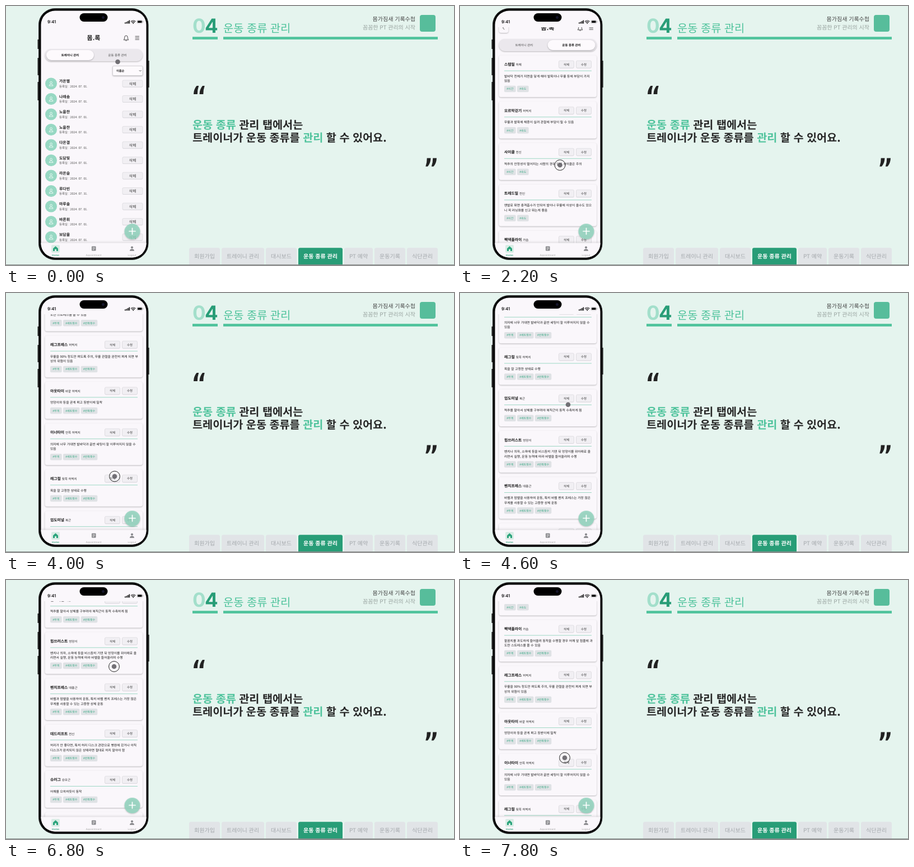
Animation of 800x464 px, one loop 8000 ms. Source, as an HTML page:

```html
<!DOCTYPE html>
<html lang="ko">
<head>
<meta charset="utf-8">
<style>
html, body { margin: 0; width: 100%; height: 100%; overflow: hidden; background: #e5f4ee; }
svg { display: block; width: 800px; height: 464px; font-family: "Noto Sans CJK KR", "Noto Sans CJK JP", sans-serif; text-rendering: geometricPrecision; }
.latin { font-family: Inter, sans-serif; }
.raised { filter: drop-shadow(0 1px 1.2px rgba(0,0,0,.26)); }
.line { fill: none; stroke-linecap: round; stroke-linejoin: round; }
</style>
</head>
<body>
<svg viewBox="0 0 800 464">
  <defs>
    <clipPath id="screenClip"><rect x="62.5" y="8.5" width="188" height="442" rx="25"/></clipPath>
    <clipPath id="listClip"><rect x="62.5" y="38" width="188" height="387"/></clipPath>
    <path id="quote" d="M5.500 0H9.200L7.300 7.500 6.800 15H0L.5 10.500C1.300 6.500 3 3 5.500 0Z"/>
  </defs>

  <g id="slide">
    <rect x="333" y="55.2" width="45" height="4.700" fill="#4fc39c"/>
    <rect x="388" y="55.2" width="383" height="4.700" fill="#4fc39c"/>
    <rect x="739" y="16" width="28" height="30" rx="4" fill="#57bd9b"/>
    <g fill="#222">
      <use href="#quote" x="335" y="143"/><use href="#quote" x="345.500" y="143"/>
      <g transform="rotate(180 759.500 280)"><use href="#quote" x="750" y="272.500"/><use href="#quote" x="760.500" y="272.500"/></g>
    </g>
  </g>

  <g id="phone">
    <path d="M57.700 60v17M57.700 93v31M57.700 136v33M254.500 98v48" stroke="#111" stroke-width="2.200"/>
    <rect x="58.500" y="4.500" width="195.500" height="450" rx="29" fill="#050505" stroke="#2b2b2d"/>
    <g clip-path="url(#screenClip)">
      <rect x="62" y="8" width="190" height="443" fill="#faf7fb"/>
      <g clip-path="url(#listClip)"><g id="scroll"></g></g>
      <g id="overlay">
        <g class="raised"><circle cx="225.500" cy="404" r="14" fill="#92d6c0" opacity=".84"/></g>
        <path class="line" d="M220 403.500h11M225.500 398v11" stroke="#fff" stroke-width="1.700"/>
        <rect x="62" y="424.500" width="190" height="30" fill="#faf7fb" style="filter:drop-shadow(0 -1px 2px rgba(0,0,0,.14))"/>
        <rect x="81" y="428" width="15" height="14" rx="2" fill="#d9ece5"/>
        <path d="M84 434.500l4.500-4.200 4.500 4.200v4.500h-3v-3.200h-3v3.200h-3z" fill="#2ba47c"/>
        <rect x="153" y="430.500" width="7.500" height="8" rx="1" fill="#858589"/>
        <path d="M154.500 432.700h4.500M154.500 434.600h4.500M154.500 436.500h3" stroke="#fff" stroke-width=".7"/>
        <circle cx="225" cy="432.500" r="2" fill="#858589"/><path d="M221 438.800q0-3.500 4-3.500t4 3.500z" fill="#858589"/>
      </g>
    </g>
    <rect x="131.500" y="13" width="50" height="15" rx="7.500"/>
    <circle cx="173.500" cy="20.500" r="2.500" fill="#15152a"/>
    <path d="M212.800 31.500v-2M215.300 31.500v-3M217.800 31.500v-4.500M220.300 31.500v-6" stroke="#111" stroke-width="1.700"/>
    <path class="line" d="M223.500 27.500q3.700-3 7.400 0M225 29.300q2.200-1.700 4.400 0" stroke="#111" stroke-width="1.200"/>
    <circle cx="227.200" cy="31" r=".9"/>
    <rect x="234" y="25.500" width="9.600" height="5.600" rx="1.700" fill="none" stroke="#999" stroke-width=".6"/>
    <rect x="235" y="26.500" width="7.600" height="3.600" rx="1"/>
    <path d="M244.700 27.300v2" stroke="#999" stroke-width=".9"/>
  </g>

  <g id="cursor">
    <circle id="ring" r="9.400" fill="#fff" fill-opacity=".2" stroke="#222" stroke-width="1"/>
    <circle r="4.300" fill="#67656a" opacity=".92"/>
  </g>
</svg>

<script>
const el = id => document.getElementById(id);
const add = (id, markup) => el(id).insertAdjacentHTML("beforeend", markup);

// y is the visual middle of the text
const text = (x, y, size, content, fill = "#222", weight = 400, anchor = "start", cls = "") =>
  `<text x="${x}" y="${y + size * .37}" font-size="${size}" fill="${fill}" font-weight="${weight}" text-anchor="${anchor}" class="${cls}">${content}</text>`;
const box = (x, y, w, h, r, fill, extra = "") =>
  `<rect x="${x}" y="${y}" width="${w}" height="${h}" rx="${r}" fill="${fill}" ${extra}/>`;
const button = (x, y, w, h, size, label) =>
  box(x, y + .5, w, h, 2, "#d3d1d6") +
  box(x, y, w, h, 2, "#f1eff3", 'stroke="#d6d4d9" stroke-width=".6"') +
  text(x + w / 2, y + h / 2, size, label, "#333", 400, "middle");

const GREEN = "#4fc39c", DEEP = "#289d77";

// Slide heading, message and footer tabs
const accent = word => `<tspan fill="${GREEN}">${word}</tspan>`;
add("slide",
  text(333, 35.3, 35, `<tspan fill="#a3dfcb">0</tspan><tspan dx="-1.500">4</tspan>`, DEEP, 700, "start", "latin") +
  text(388, 39.5, 19.8, "운동 종류 관리", GREEN, 500) +
  text(731, 23.5, 10, "몸가짐새 기록수첩", "#444", 500, "end") +
  text(731, 38, 10, "꼼꼼한 PT 관리의 시작", "#98a39f", 400, "end") +
  text(333, 213, 19.65, `${accent("운동 종류")} 관리 탭에서는`, "#262626", 700) +
  text(333, 236, 19.65, `트레이너가 운동 종류를 ${accent("관리")} 할 수 있어요.`, "#262626", 700));

let tabX = 327;
for (const [label, width] of [["회원가입", 55], ["트레이니 관리", 76], ["대시보드", 55], ["운동 종류 관리", 79],
                              ["PT 예약", 51], ["운동기록", 55], ["식단관리", 55]]) {
  const active = width === 79;
  add("slide", box(tabX, 433.3, width, 34, 3, active ? DEEP : "#e1e4e7") +
    text(tabX + width / 2, 448, 10, label, active ? "#fff" : "#a4a8ac", active ? 700 : 500, "middle"));
  tabX += width + 3;
}
add("slide", box(0, 463, 800, 1, 0, "#858b89"));

// Phone chrome
add("phone", text(74, 28, 7.6, "9:41", "#111", 600, "start", "latin"));
add("overlay",
  text(88.5, 446, 4.6, "Home", DEEP, 500, "middle", "latin") +
  text(156.5, 446, 4.6, "Appointment", "#aaa", 400, "middle", "latin") +
  text(225, 446, 4.6, "Logout", "#aaa", 400, "middle", "latin"));

const pageTop = exercises => {
  const pill = exercises ? 156.5 : 72;
  const tab = (x, label, on) => text(x, 87.7, 5.4, label, on ? "#111" : "#444", on ? 700 : 400, "middle");
  return text(156.5, 57, 11, "몸.록", "#222", 700, "middle") +
    `<g class="line" stroke="#333" stroke-width=".9"><path d="M210.500 60.500q1.200-1 1.200-4 0-3.500 2.800-3.500t2.800 3.500q0 3 1.200 4zM213.500 62q1 .8 2 0M231 54.300h6.500M231 57.200h6.500M231 60.100h6.500"/></g>` +
    (exercises ? box(69.5, 48, 17, 18, 4, "#faf7fb", 'class="raised"') +
      `<path class="line" d="M79 54.500l-2.500 2.700 2.500 2.700" stroke="#444" stroke-width=".9"/>` : "") +
    box(69.5, 77, 174.5, 22, 11, "#ebe8ed", 'class="raised"') +
    box(pill, 79, 85, 18, 9, "#fdfafd", 'class="raised"') +
    tab(114.5, "트레이니 관리", !exercises) + tab(199, "운동 종류 관리", exercises);
};

// Trainee list
const trainees = "가온별 나래솜 노을찬 노을찬 다온결 도담빛 라온슬 루다빈 마루솔 바론휘 보담율".split(" ");
const traineeRow = (name, i) => {
  const y = 139 + 27.5 * i;
  return `<circle cx="80.500" cy="${y}" r="10.500" fill="#97d8c3"/>
    <g transform="translate(80.500 ${y})" fill="none" stroke="#eefaf5" stroke-width=".9"><circle cy="-1.800" r="1.900"/><path d="M-3.500 4q0-3 3.500-3t3.500 3z"/></g>` +
    text(95, y - 4.2, 6.9, name, "#222", 700) +
    text(95, y + 5, 5.4, `등록일 : 2024. 07. ${i === 7 ? 31 : "01"}.`, "#555") +
    button(208, y - 6, 36, 12, 6.9, "삭제");
};

// Exercise cards: name, body part, description lines
const exercises = [
  "스텝밀/하체/발바닥 전체가 지면을 닿게 해야 발목이나 무릎 등에 부담이 가지/않음",
  "오르막걷기/허벅지/무릎과 발목에 체중이 실려 관절에 부담이 될 수 있음",
  "사이클/전신/척추의 안정성이 떨어지는 사람의 경우 입식 사이클은 주의",
  "트레드밀/전신/맨발로 뛰면 충격흡수가 안되어 발이나 무릎에 이상이 올수도 있으/니 꼭 러닝화를 신고 뛰는게 좋음",
  "펙덱플라이/가슴/팔꿈치를 과도하게 들어올려 동작을 수행할 경우 어깨 앞 힘줄에 과/도한 스트레스를 줄 수 있음",
  "레그프레스/허벅지/무릎을 90% 정도만 펴도록 주의, 무릎 관절을 완전히 펴게 되면 부/상의 위험이 있음",
  "아웃타이/바깥 허벅지/엉덩이와 등을 곧게 펴고 등받이에 밀착",
  "이너타이/안쪽 허벅지/의자에 너무 기대면 발바닥과 골반 세팅이 잘 이루어지지 않을 수/있음",
  "레그컬/뒷쪽 허벅지/목을 잘 고정한 상태로 수행",
  "업도미널/복근/척추를 말아서 상체를 구부려야 복직근이 동적 수축하게 됨",
  "힙쓰러스트/엉덩이/벤치나 의자, 소파에 등을 비스듬히 기댄 뒤 엉덩이를 위아래로 올/리면서 실행, 운동 능력에 따라 바벨을 들어올리며 수행",
  "벤치프레스/대흉근/바벨과 덤벨을 사용하여 운동, 특히 바벨 벤치 프레스는 가장 많은/무게를 사용할 수 있는 고중량 상체 운동",
  "데드리프트/전신/허리가 안 좋다면, 특히 허리 디스크 관련으로 병원에 갔거나 아직/디스크가 완치되지 않은 상태라면 절대로 하지 말아야 함",
  "슈러그/승모근/어깨를 으쓱하듯이 동작",
  "레더럴레이즈/삼각근/양손에 덤벨을 들고 실시하는 것이 보통이나 케이블 등으로 대체 가/능",
  "덤벨컬/이두근/팔꿈치를 고정한 상태로 수행"
];
let cardY = 122.5;
const exerciseCard = (entry, i) => {
  const [name, part, ...lines] = entry.split("/");
  const y = cardY, extra = (lines.length - 1) * 8.5;
  cardY += 74.3 + extra;
  let tagX = 79;
  const tags = (i < 4 ? ["#시간", "#속도"] : ["#무게", "#세트횟수", "#반복횟수"]).map(tag => {
    const w = tag.length > 3 ? 29.5 : 20.7, x = tagX;
    tagX += w + 2.3;
    return box(x, y + 29.8 + extra, w, 11.5, 2, "#dfe2e5") + text(x + w / 2, y + 35.5 + extra, 5, tag, "#35a983", 500, "middle");
  });
  return box(69.5, y - 16.3, 174.5, 66.5 + extra, 4, "#faf7fb", 'class="raised"') +
    text(79, y, 6.8, `${name}<tspan dx="2" font-size="5.500" font-weight="400" fill="#222">${part}</tspan>`, "#111", 700) +
    button(176.5, y - 6.5, 27, 13, 5.5, "삭제") + button(207.5, y - 6.5, 27, 13, 5.5, "수정") +
    box(79, y + 11.2, 156, .8, 0, "#86cfb6") +
    lines.map((line, n) => text(79, y + 21 + 8.6 * n, 5.78, line, "#151515")).join("") + tags.join("");
};

add("scroll",
  `<g id="traineePage">${pageTop(false)}` +
  box(190.5, 107.5, 53.5, 17, 2, "#fdfafd", 'stroke="#c9c7cc" stroke-width=".7" class="raised"') +
  text(197, 116, 5.2, "이름순", "#222", 700) +
  `<path class="line" d="M238 115.300l1.700 1.700 1.700-1.700" stroke="#333" stroke-width=".8"/>` +
  trainees.map(traineeRow).join("") + `</g>` +
  `<g id="exercisePage">${pageTop(true)}${exercises.map(exerciseCard).join("")}</g>`);

// Touch path: time, scroll offset, cursor x, cursor y, pressed
const path = [
  [0, 0, 199.5, 100, 0], [400, 0, 199, 88, 0], [600, 0, 199, 88, 1], [800, 0, 199, 88, 0], [1200, 0, 198, 95, 0],
  [1600, 0, 179, 303, 0], [2000, 0, 179, 303, 1], [2200, 18, 178.5, 285, 1], [2400, 115, 181, 188, 1],
  [2600, 190, 184, 150, 0], [3000, 210.7, 182, 334, 1], [3400, 345, 192, 200, 1], [3600, 405, 194, 170, 0],
  [4000, 427, 194, 328.5, 1], [4400, 610, 194, 146, 1], [4600, 645, 193, 200, 0], [4800, 660, 194, 330, 1],
  [5200, 850, 193.5, 140, 1], [5400, 890, 193.5, 118, 0], [5600, 901.3, 193.5, 118, 0], [6000, 901.3, 193.5, 118, 0],
  [6200, 901.3, 193, 125, 1], [6400, 840, 193, 186, 1], [6600, 805, 193, 160, 0], [6800, 798.5, 193, 155, 1],
  [7200, 620, 188, 325, 1], [7400, 540, 188, 240, 0], [7600, 510, 187, 158, 1], [7800, 349.2, 187, 318.5, 1]
];

function draw() {
  const t = Math.floor(performance.now() % 8000 / 200) * 200;
  const i = path.findLastIndex(key => key[0] <= t);
  const from = path[i], to = path[i + 1] || from;
  const p = (t - from[0]) / (to[0] - from[0] || 1);
  const [, scroll, x, y] = from.map((v, k) => v + (to[k] - v) * p);
  el("scroll").setAttribute("transform", `translate(0 ${-scroll})`);
  el("cursor").setAttribute("transform", `translate(${x} ${y})`);
  el("ring").style.display = from[4] ? "" : "none";
  el("traineePage").style.display = t < 800 ? "" : "none";
  el("exercisePage").style.display = t < 800 ? "none" : "";
  requestAnimationFrame(draw);
}
draw();
</script>
</body>
</html>
```
